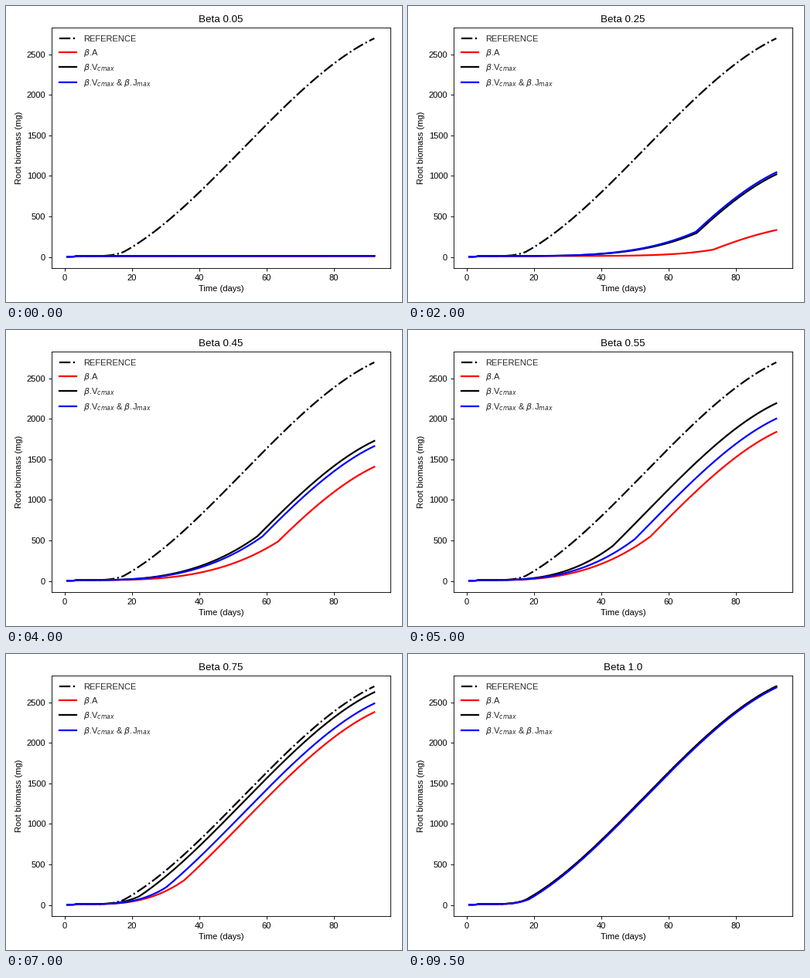
These frames come from a looping animation (512 by 384 pixels, 10000 ms). A matplotlib script:

```python
import numpy as np
import matplotlib.pyplot as plt
from matplotlib.animation import FuncAnimation

plt.rcParams.update({
    "font.family": "Liberation Sans",
    "font.size": 10,
    "axes.titlesize": 12,
    "mathtext.fontset": "dejavusans",
})

WIDTH, HEIGHT, DPI = 512, 384, 80
FRAMES, INTERVAL = 20, 500
LAST_DAY = 92
GERMINATION = 8
SEED_MASS = 11
FULL_MASS = 2700

days = np.linspace(0.75, LAST_DAY, 366)
base = np.interp(days, [1, 2.8, 3.6], [2, 4, SEED_MASS])

# Light-limited growth once the canopy has closed.
canopy = np.poly1d(np.polyfit(
    [18, 30, 40, 50, 60, 70, 80, LAST_DAY],
    [72, 425, 797, 1210, 1640, 2037, 2388, FULL_MASS], 4))

# Final mass of each run at a few values of beta.
KEY_BETAS = [.12, .25, .45, .55, .65, .85, 1]
RUNS = {
    "red": (r"$\beta$.A",
            [11, 332, 1410, 1840, 2105, 2658, 2699]),
    "black": (r"$\beta$.V$_{cmax}$",
              [12, 1020, 1730, 2195, 2575, 2680, 2700]),
    "blue": (r"$\beta$.V$_{cmax}$ & $\beta$.J$_{max}$",
             [12, 1045, 1665, 2005, 2300, 2678, 2685]),
}


def biomass(final):
    """Power-law growth up to canopy closure, then the shared canopy curve."""
    vigour = final / FULL_MASS
    closure = 17.5 + 60 * (1 - np.exp((vigour - 1) / 0.33))
    power = 2.6 + 1.1 * ((final - 2050) / 1000) ** 2

    remaining = canopy(LAST_DAY) - canopy(closure)
    late_gain = min(remaining,
                    (0.75 + 0.25 * vigour ** 2) * (final - SEED_MASS))
    early_gain = final - late_gain - SEED_MASS

    age = np.clip((days - GERMINATION) / (closure - GERMINATION), 0, 1)
    early = base + early_gain * age ** power
    late = final - late_gain * (canopy(LAST_DAY) - canopy(days)) / remaining
    return np.where(days < closure, early, late)


fig = plt.figure(figsize=(WIDTH / DPI, HEIGHT / DPI), dpi=DPI)
ax = fig.add_axes([59 / WIDTH, 1 - 340 / HEIGHT, 438 / WIDTH, 312 / HEIGHT])
ax.set(xlim=(-3.87, 96.77), ylim=(-138, 2833),
       xlabel="Time (days)", ylabel="Root biomass (mg)")
ax.set_xticks(range(0, 81, 20))
ax.set_yticks(range(0, 2501, 500))
title = ax.set_title("")

ax.plot(days, biomass(FULL_MASS), "-.", color="black", lw=2,
        label="REFERENCE")
lines = {color: ax.plot([], [], color=color, lw=2, label=label)[0]
         for color, (label, _) in RUNS.items()}
ax.legend(loc="upper left", frameon=False, labelcolor="0.15")


def update(frame):
    beta = round(0.05 * (frame + 1), 2)
    title.set_text(f"Beta {beta}")
    for color, (_, finals) in RUNS.items():
        final = np.interp(beta, KEY_BETAS, finals)
        lines[color].set_data(days, biomass(final))
    return [title, *lines.values()]


anim = FuncAnimation(fig, update, frames=FRAMES, interval=INTERVAL,
                     repeat=True, repeat_delay=0, blit=False)
plt.show()
```
